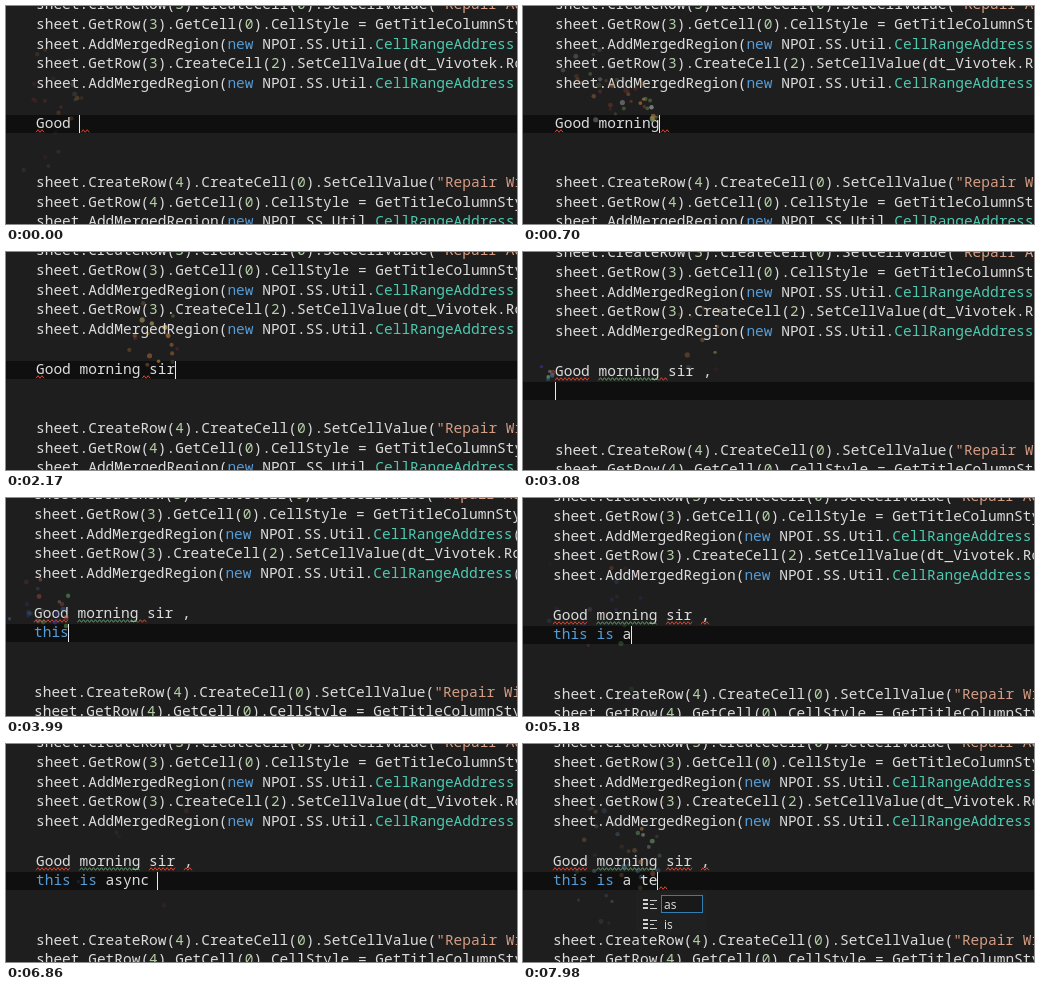
Animation of 511x218 px, one loop 8 s. Source, as an HTML page with a canvas:

```html
<!DOCTYPE html>
<html lang="en">
<head>
<meta charset="utf-8">
<title>Typing with sparks</title>
<style>
  html, body { margin: 0; width: 100%; height: 100%; overflow: hidden; background: #1e1e1e; }
  canvas { display: block; width: 511px; height: 218px; }
</style>
</head>
<body>
<canvas id="stage"></canvas>
<script>
const W = 511, H = 218, LOOP = 8000, STEP = 70;
const LEFT = 30, CHAR = 8.7, ROW = 19.75, BASE = 3;
const CODE_FONT = '500 14.5px "Noto Sans Mono", monospace';
const MENU_FONT = '12px "Open Sans", sans-serif';
const RED = '#d6452f', GREEN = '#5f9a68';

const canvas = document.getElementById('stage');
const ctx = canvas.getContext('2d');
const ratio = window.devicePixelRatio || 1;
canvas.width = W * ratio;
canvas.height = H * ratio;

const above = [
  'sheet.CreateRow(3).CreateCell(0).SetCellValue("Repair Ad',
  'sheet.GetRow(3).GetCell(0).CellStyle = GetTitleColumnStyle',
  'sheet.AddMergedRegion(new NPOI.SS.Util.CellRangeAddress(3',
  'sheet.GetRow(3).CreateCell(2).SetCellValue(dt_Vivotek.Rows',
  'sheet.AddMergedRegion(new NPOI.SS.Util.CellRangeAddress(3'
];
const below = [
  'sheet.CreateRow(4).CreateCell(0).SetCellValue("Repair Wi',
  'sheet.GetRow(4).GetCell(0).CellStyle = GetTitleColumnStyle',
  'sheet.AddMergedRegion(new NPOI.SS.Util.CellRangeAddress(4'
];

// Each run: start time, gap between keys, keys ("<" deletes).
const runs = [
  [-980, 105, [...'Good ']],
  [140, 84, [...'morning ']],
  [1610, 140, [...'sir']],
  [2450, 210, [' ', ',']],
  [2940, 0, ['\n']],
  [3360, 140, [...'this']],
  [4060, 140, [...' is a']],
  [5900, 0, ['sync ']],
  [6930, 90, [...'<<<<<']],
  [7420, 140, [...' te']]
];

const keys = [];
let typed = '';
for (const [start, gap, list] of runs) {
  list.forEach((key, i) => {
    typed = key === '<' ? typed.slice(0, -1) : typed + key;
    const lines = typed.split('\n');
    keys.push({ time: start + i * gap, lines, row: 5 + lines.length, col: lines.at(-1).length });
  });
}

const palettes = [
  ['#9aa09a', '#6f8f50', '#a06a3c', '#8c3a32'],
  ['#f0a040', '#d8803a', '#f0d488', '#8c3530'],
  ['#5fae58', '#4f80c0', '#9aa09a', '#c05545', '#3838a0'],
  ['#6fa3c8', '#c9cdc4', '#d6a060', '#7aa878', '#b07050']
];
const paletteAt = time => palettes[time < 1500 ? 0 : time < 2900 ? 1 : time < 6500 ? 2 : 3];

function random(seed) {
  const v = Math.sin(seed * 127.1 + 31.7) * 43758.5453;
  return v - Math.floor(v);
}

const colX = col => LEFT + col * CHAR;
const baseY = row => Math.round(BASE + row * ROW);

function codeLine(text, row) {
  const tokens = /"[^"]*|\b(?:new|this|is)\b|CellRangeAddress|\b\d+\b|[A-Za-z_]\w*|[^\w"\s]+/g;
  for (const { 0: token, index } of text.matchAll(tokens)) {
    ctx.fillStyle = token[0] === '"' ? '#d69d85'
      : /^(new|this|is)$/.test(token) ? '#569cd6'
      : token === 'CellRangeAddress' ? '#4ec9b0'
      : /^\d/.test(token) ? '#b5cea8' : '#dcdcdc';
    ctx.fillText(token, colX(index), baseY(row));
  }
}

function squiggle(from, to, row, color) {
  const y = baseY(row) + 3, end = colX(to);
  ctx.beginPath();
  for (let x = colX(from), i = 0; x <= end; x += 2, i++) ctx.lineTo(x, y + (i % 2 ? -1.3 : 1.3));
  ctx.strokeStyle = color;
  ctx.lineWidth = 1;
  ctx.stroke();
}

function errors(time, { lines, col }) {
  if (lines.length === 1) {
    squiggle(0, 1, 6, RED);
    const mark = time < 1610 ? col : time < 2300 ? 12 : col;
    squiggle(mark + 0.2, mark + 1.2, 6, RED);
    return;
  }
  squiggle(0, 4, 6, RED);
  squiggle(5, 12, 6, GREEN);
  if (time < 4200) {
    squiggle(12, 13, 6, RED);
  } else {
    squiggle(13, 16, 6, RED);
    squiggle(17, 18, 6, RED);
  }
  if (time > 7400) squiggle(col + 0.2, col + 1.3, 7, RED);
}

function sparks(time) {
  keys.forEach((key, k) => {
    const age = (time - key.time) / 1000;
    if (age < 0 || age > 1) return;
    const colors = paletteAt(key.time);
    for (let i = 0; i < 6; i++) {
      const seed = k * 19 + i * 3.7;
      const vx = -80 + 115 * random(seed);
      const vy = -60 - 150 * random(seed + 1);
      const x = colX(key.col) - 4 + vx * age;
      const y = baseY(key.row) - 4 + vy * age + 135 * age * age;
      ctx.globalAlpha = Math.exp(-1.9 * age) * (0.4 + 0.6 * random(seed + 3));
      ctx.fillStyle = colors[Math.floor(random(seed + 2) * colors.length)];
      ctx.beginPath();
      ctx.arc(x, y, 1.6 + random(seed + 4), 0, Math.PI * 2);
      ctx.fill();
    }
  });
  ctx.globalAlpha = 1;
}

function menuIcon(x, y) {
  ctx.fillStyle = '#d0d0d0';
  for (const [dx, dy, w] of [[0, 0, 5], [0, 4, 5], [0, 8, 5], [7, 1, 7], [7, 5, 4], [7, 9, 7]]) {
    ctx.fillRect(x + dx, y + dy, w, dy % 4 ? 1 : 2);
  }
}

function menu() {
  ctx.fillStyle = '#202021';
  ctx.fillRect(113, 148, 70, 42);
  ctx.fillStyle = '#19191a';
  ctx.fillRect(138, 151, 42, 18);
  ctx.strokeStyle = '#2f7fb5';
  ctx.lineWidth = 1;
  ctx.strokeRect(138.5, 151.5, 41, 17);
  ctx.font = MENU_FONT;
  ['as', 'is'].forEach((word, i) => {
    menuIcon(120, 155 + i * 20);
    ctx.fillStyle = '#e0e0e0';
    ctx.fillText(word, 141, 164.5 + i * 20);
  });
}

function draw(time) {
  const state = keys.findLast(key => key.time <= time);
  const { lines, row, col } = state;
  const beat = time / STEP - 57;
  const shake = time - state.time <= 210 ? -2 : 0;

  ctx.setTransform(ratio, 0, 0, ratio, 0, 0);
  ctx.fillStyle = '#1e1e1e';
  ctx.fillRect(0, 0, W, H);
  ctx.translate(Math.round(shake * Math.cos(beat * 2.2)), Math.round(shake * Math.cos(beat * 1.7)));

  const top = Math.round(baseY(row) - 13.5);
  ctx.fillStyle = '#0f0f0f';
  ctx.fillRect(-5, top, W + 10, 18);

  ctx.font = CODE_FONT;
  above.forEach((text, i) => codeLine(text, i));
  lines.forEach((text, i) => codeLine(text, 6 + i));
  below.forEach((text, i) => codeLine(text, row + 3 + i));
  errors(time, state);

  ctx.fillStyle = '#e8e8e8';
  ctx.fillRect(Math.floor(colX(col)), top, 1, 18);
  if (time >= 7560) menu();
  sparks(time);
}

function frame(now) {
  draw(Math.floor((now % LOOP) / STEP) * STEP);
  requestAnimationFrame(frame);
}
requestAnimationFrame(frame);
</script>
</body>
</html>
```
